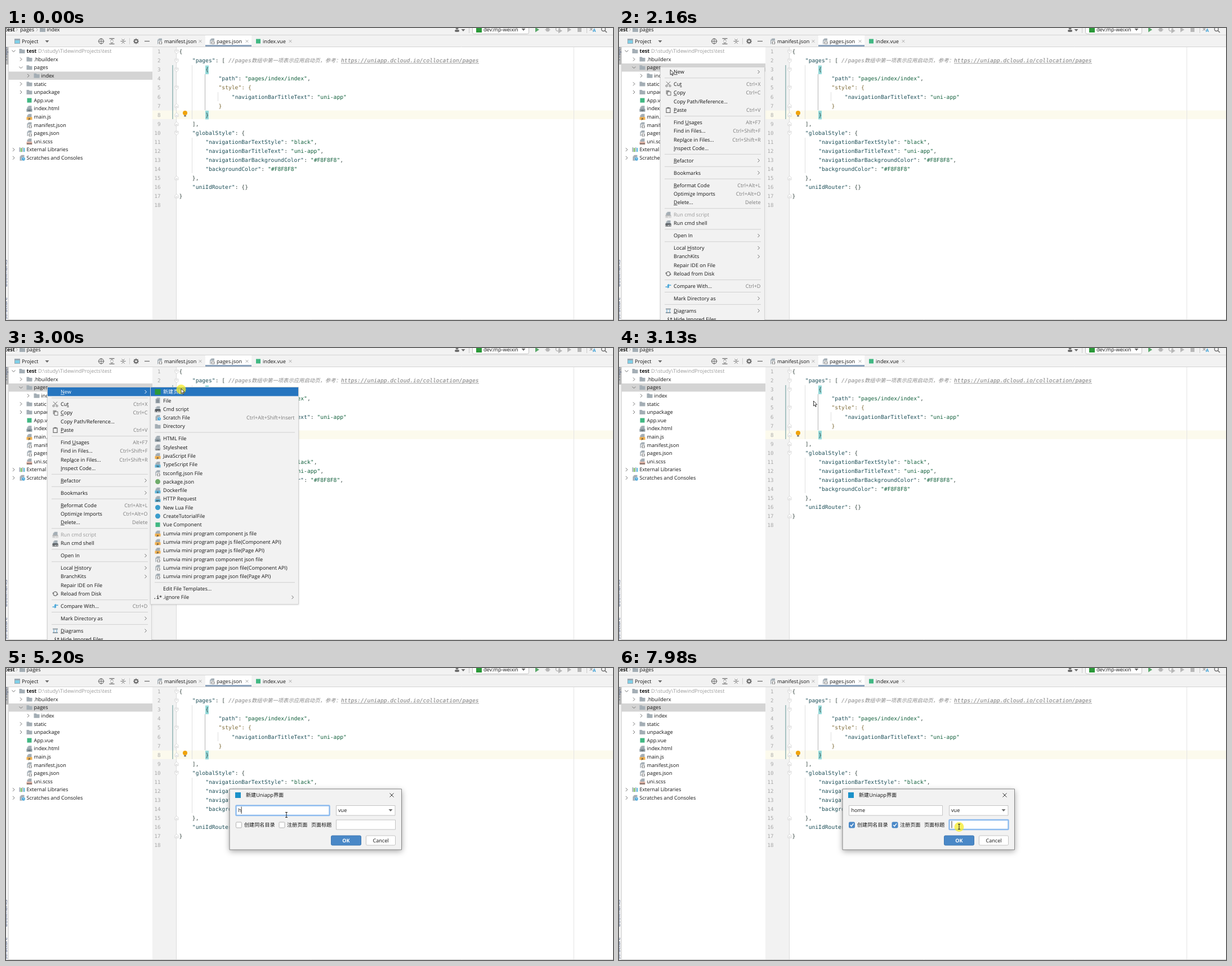
These frames come from a looping animation (1078 by 519 pixels, 8000 ms). An HTML page with a canvas:

```html
<!DOCTYPE html>
<html lang="zh">
<head>
<meta charset="utf-8">
<style>
html, body { margin: 0; width: 100%; height: 100%; overflow: hidden; background: #fff; }
canvas { display: block; }
</style>
</head>
<body>
<canvas id="stage" width="1078" height="519"></canvas>
<script>
const g = document.getElementById('stage').getContext('2d');
g.textRendering = 'geometricPrecision';
const UI = '"Open Sans", "Noto Sans CJK SC", "Noto Sans CJK", sans-serif';
const MONO = '"DejaVu Sans Mono", "Noto Sans CJK SC", monospace';
const INK = '#141414', GRAY = '#7c7c7c', PANEL = '#f2f2f2', BLUE = '#2675bf', GREEN = '#41b883', STEEL = '#6e6e6e';
const COL = 5.833, LINE = 16.06;

// y is the optical centre of the line
function text(s, x, y, color = INK, font = '9.1px ' + UI, align = 'left') {
  g.font = font;
  g.fillStyle = color;
  g.textAlign = align;
  g.fillText(s, x, y + 3.2);
}
function box(x, y, w, h, fill, stroke, r = 0, lw = 1) {
  g.beginPath();
  g.roundRect(x, y, w, h, r);
  if (fill) { g.fillStyle = fill; g.fill(); }
  if (stroke) { g.strokeStyle = stroke; g.lineWidth = lw; g.stroke(); }
}
function path(points, stroke, lw = 1, fill) {
  g.beginPath();
  for (let i = 0; i < points.length; i += 2) g.lineTo(points[i], points[i + 1]);
  if (fill) { g.closePath(); g.fillStyle = fill; g.fill(); }
  if (stroke) { g.strokeStyle = stroke; g.lineWidth = lw; g.stroke(); }
}
function disc(x, y, r, fill, stroke, lw = 1) {
  g.beginPath();
  g.arc(x, y, r, 0, 7);
  if (fill) { g.fillStyle = fill; g.fill(); }
  if (stroke) { g.strokeStyle = stroke; g.lineWidth = lw; g.stroke(); }
}
function at(x, y, draw) {
  g.save();
  g.translate(x, y);
  draw();
  g.restore();
}
function shadow(blur, alpha, draw) {
  g.save();
  g.shadowColor = `rgba(0,0,0,${alpha})`;
  g.shadowBlur = blur;
  g.shadowOffsetY = blur / 4;
  draw();
  g.restore();
}
const right = (x, y, c = STEEL) => path([x - 1.5, y - 3, x + 1.5, y, x - 1.5, y + 3], c);
const down = (x, y, c = STEEL) => path([x - 3, y - 1.5, x, y + 1.5, x + 3, y - 1.5], c);
const caretDown = (x, y) => path([x - 3.5, y - 2, x + 3.5, y - 2, x, y + 2], null, 0, '#6a6a6a');
const play = (x, y, c) => path([x - 3, y - 4.5, x + 4, y, x - 3, y + 4.5], null, 0, c);
const cross = (x, y, r, c) => { path([x - r, y - r, x + r, y + r], c); path([x - r, y + r, x + r, y - r], c); };

const TAGS = { html: ['#8b9aa3', '<>'], js: ['#f0b04f', 'JS'], css: ['#b9c0c5', 'CSS'], ts: ['#5fb4d8', 'TS'],
  api: ['#5fb4d8', 'API'], docker: ['#5fb4d8', 'D'], sass: ['#eebfb0', 'SASS'], cmd: ['#33383d', 'CMD'], cmdOff: ['#b5b5b5', 'CMD'] };
function icon(kind, x, y) {
  if (!kind) return;
  at(x, y, () => {
    if (kind === 'dir') return path([-5, -4, -1, -4, 0.5, -2.5, 5, -2.5, 5, 4, -5, 4], null, 0, '#a4aeb5');
    if (kind === 'vue') return box(-4, -4, 8, 8, GREEN);
    if (kind === 'uni') return box(-5, -5, 10, 10, '#2b9939');
    if (kind === 'node') return disc(0, 0, 4.5, '#6fab6a');
    if (kind === 'lua') return disc(0, 0, 4.5, '#3b9dcc');
    if (kind === 'cut') {
      path([-3.5, -4.5, 2.5, 2], STEEL); path([3.5, -4.5, -2.5, 2], STEEL);
      disc(-3, 3, 1.6, null, STEEL); disc(3, 3, 1.6, null, STEEL);
      return;
    }
    if (kind === 'copy') { box(-4, -4.5, 6, 7, '#9a9a9a'); return box(-1.5, -2, 6, 6.5, PANEL, STEEL); }
    if (kind === 'paste') { box(-3.5, -3.5, 7, 8, null, STEEL, 0, 1.2); return box(-2, -5, 4, 2.5, STEEL); }
    if (kind === 'reload') {
      g.beginPath(); g.arc(0, 0, 3.6, 3.4, 6); g.moveTo(3.5, 1); g.arc(0, 0, 3.6, 0.3, 2.9);
      g.strokeStyle = STEEL; g.lineWidth = 1.3; g.stroke();
      path([-5, -2.5, -1.5, -0.5, -4.5, 1], null, 0, STEEL);
      return path([5, 2.5, 1.5, 0.5, 4.5, -1], null, 0, STEEL);
    }
    if (kind === 'diff') {
      path([-5, 1.5, 0, 1.5], '#389fd6', 1.4); path([0, -1.5, 5, -1.5], '#389fd6', 1.4);
      path([-1, -1.2, 2, 1.5, -1, 4.2], null, 0, '#389fd6');
      return path([1, -4.2, -2, -1.5, 1, 1.2], null, 0, '#389fd6');
    }
    if (kind === 'diagram') {
      box(-4.5, -4, 9, 2, '#8f9ba3'); box(-4.5, 2.5, 9, 2, '#8f9ba3');
      path([-2.5, -2, -2.5, 3], '#5fa9d4');
      return path([2.5, -2, 2.5, 3], '#5fa9d4');
    }
    if (kind === 'ignore') return text('.i*', 0, 0, '#333', 'bold 8.5px ' + MONO, 'center');
    if (kind === 'libs') {
      ['#9aa7b0', '#62b543', '#9aa7b0', '#40b6e0'].forEach((c, i) => box(-5 + i * 2.7, -4 + i % 2, 1.8, 8 - i % 2, c));
      return;
    }
    path([-1, -5, 4, -5, 4, 5, -4, 5, -4, -2], null, 0, '#a4aeb5');
    path([-4, -2.6, -1.6, -5, -1.6, -2.6], null, 0, '#c3cacf');
    if (kind === 'scratch') { disc(2.5, 2, 3.2, '#389fd6', '#fff', .6); path([2.5, 0, 2.5, 2.3, 4, 2.3], '#fff', .8); }
    else if (kind === 'json') { box(-2.5, -1, 8, 6.5, '#f4f4f4'); text('{}', 1.5, 1.3, '#555', 'bold 6px ' + MONO, 'center'); }
    else if (kind === 'file') { for (const d of [-1, 1, 3]) path([-2.5, d, 2.5, d], '#5e6a72', .8); }
    else { const [c, label] = TAGS[kind]; box(-5, 0.5, 10, 5, c); text(label, 0, 2, kind.startsWith('cmd') ? '#fff' : '#333', 'bold 4px ' + UI, 'center'); }
  });
}

const CODE = `{
    "pages": [
        {
            "path": "pages/index/index",
            "style": {
                "navigationBarTitleText": "uni-app"
            }
        }
    ],
    "globalStyle": {
        "navigationBarTextStyle": "black",
        "navigationBarTitleText": "uni-app",
        "navigationBarBackgroundColor": "#F8F8F8",
        "backgroundColor": "#F8F8F8"
    },
    "uniIdRouter": {}
}
`.split('\n');
const TREE = [
  ['dir', 'test', 0, 'v'], ['dir', '.hbuilderx', 1, '>'], ['dir', 'pages', 1, 'v'], ['dir', 'index', 2, '>'],
  ['dir', 'static', 1, '>'], ['dir', 'unpackage', 1, '>'], ['vue', 'App.vue', 1], ['html', 'index.html', 1],
  ['js', 'main.js', 1], ['json', 'manifest.json', 1], ['json', 'pages.json', 1], ['sass', 'uni.scss', 1],
  ['libs', 'External Libraries', 0, '>'], ['scratch', 'Scratches and Consoles', 0, '>']];
// icon | label with _ before the mnemonic | shortcut or > for a submenu
const parse = s => s.trim().split('\n').map(l => l.split('|'));
const MENU = parse(`
|_New|>
-
cut|Cu_t|Ctrl+X
copy|_Copy|Ctrl+C
|Copy Path/Reference...
paste|_Paste|Ctrl+V
-
|Find _Usages|Alt+F7
|Find in Files...|Ctrl+Shift+F
|Repl_ace in Files...|Ctrl+Shift+R
|_Inspect Code...
-
|_Refactor|>
-
|Bookmarks|>
-
|_Reformat Code|Ctrl+Alt+L
|Optimi_ze Imports|Ctrl+Alt+O
|_Delete...|Delete
-
cmdOff|Run cmd script
cmd|Run cmd shell
-
|Open In|>
-
|Local _History|>
|BranchKits|>
|Repair IDE on File
reload|Reload from Disk
-
diff|Compare With...|Ctrl+D
-
|Mark Directory as|>
-
diagram|_Diagrams|>
ignore|Hide Ignored Files`);
const SUBMENU = parse(`
uni|新建页面
file|File
cmd|Cmd script
scratch|Scratch File|Ctrl+Alt+Shift+Insert
dir|Directory
-
html|HTML File
css|Stylesheet
js|JavaScript File
ts|TypeScript File
json|tsconfig.json File
node|package.json
docker|Dockerfile
api|HTTP Request
lua|New Lua File
lua|CreateTutorialFile
vue|Vue Component
js|Lumvia mini program component js file
js|Lumvia mini program page js file(Component API)
js|Lumvia mini program page js file(Page API)
json|Lumvia mini program component json file
json|Lumvia mini program page json file(Component API)
json|Lumvia mini program page json file(Page API)
-
|Edit File Templates...
ignore|.ignore File|>`);

function toolbar(selected) {
  box(0, 0, 1078, 33, PANEL);
  path([0, 12.5, 1078, 12.5], '#d4d4d4');
  path([0, 33.5, 1078, 33.5], '#d4d4d4');
  text('test', -2, 3, INK, 'bold 9.1px ' + UI);
  right(19, 3, '#aaa');
  if (!selected) { text('pages', 25, 3); right(55, 3, '#aaa'); }
  const x = selected ? 29 : 65;
  icon('dir', x, 3);
  text(selected ? 'pages' : 'index', x + 7.5, 3);

  disc(801, 0, 2.5, STEEL); box(797, 3, 8, 4, STEEL, null, 2); caretDown(812, 4);
  path([822.5, 0, 822.5, 9], '#ccc');
  box(828.5, -6, 100, 16.5, '#fff', '#c0c0c0', 3);
  icon('uni', 840, 3);
  text('dev:mp-weixin', 848, 3);
  caretDown(919, 3);
  play(943, 3, '#59a869');
  disc(962, 3, 3.5, '#b8b8b8'); path([957, 3, 967, 3], '#b8b8b8');
  disc(980, 2, 3.5, null, '#b8b8b8', 1.5); play(984, 5, '#b8b8b8');
  play(1000, 3, '#b8b8b8');
  box(1015, 0, 7, 7, '#b8b8b8');
  path([1031.5, 0, 1031.5, 9], '#ccc');
  text('文', 1036, 1, '#555', '6.5px ' + UI); text('A', 1042, 4, '#389fd6', 'bold 8px ' + UI);
  disc(1061, 2, 3.5, null, STEEL, 1.4); path([1063.5, 4.5, 1067, 8], STEEL, 1.6);

  box(15, 19, 10, 9, '#9aa7b0'); box(16, 22, 8, 5, '#7fd0e8');
  text('Project', 28, 23.5);
  caretDown(73, 24);
  disc(169, 23.5, 4.3, null, STEEL, 1.2);
  path([169, 18, 169, 29], STEEL); path([163.5, 23.5, 174.5, 23.5], STEEL);
  for (const [x, dir] of [[188, 1], [208, -1]]) {
    for (const s of [-1, 1]) {
      if (dir > 0) path([x - 4.5, 23.5 + s * 4.8, x + 4.5, 23.5 + s * 4.8], STEEL, 1.3);
      path([x - 2.5, 23.5 + s * (dir > 0 ? 1 : 4), x, 23.5 + s * (dir > 0 ? 3.5 : 1.5), x + 2.5, 23.5 + s * (dir > 0 ? 1 : 4)], STEEL);
    }
    if (dir < 0) path([x - 4.5, 23.5, x + 4.5, 23.5], STEEL);
  }
  path([219.5, 18, 219.5, 29], '#d0d0d0');
  disc(231, 23.5, 2.8, null, STEEL, 2);
  for (let a = 0; a < 8; a++) {
    const c = Math.cos(a * Math.PI / 4), s = Math.sin(a * Math.PI / 4);
    path([231 + c * 3, 23.5 + s * 3, 231 + c * 5, 23.5 + s * 5], STEEL, 1.5);
  }
  path([246, 23.5, 255, 23.5], STEEL, 1.3);

  box(354, 13, 82, 20, '#fff');
  box(354, 30, 82, 3, '#8ca3bd');
  for (const [kind, label, x, close] of [['json', 'manifest.json', 273, 345], ['json', 'pages.json', 366, 428], ['vue', 'index.vue', 448, 505]]) {
    icon(kind, x, 23.5);
    text(label, x + 8, 23.5);
    cross(close, 23.5, 2.3, '#a8a8a8');
  }
}
function tree(selected) {
  box(5, 34, 255, 485, '#fff');
  box(5, selected ? 63 : 77.5, 255, 14.5, '#d4d4d4');
  TREE.forEach(([kind, label, depth, arrow], i) => {
    const y = 41 + i * 14.6, x = 29 + depth * 13;
    if (arrow) (arrow === 'v' ? down : right)(x - 15.5, y);
    icon(kind, x - 0.5, y);
    text(label, x + 7.5, y, INK, (i ? '' : 'bold ') + '9.1px ' + UI);
  });
  text('D:\\study\\TidewindProjects\\test', 57, 41, '#999');
  g.save();
  g.beginPath(); g.rect(0, 13, 4.5, 506); g.clip();
  box(0, 13, 5, 506, PANEL);
  box(0, 13, 5, 52, '#b9b9b9');
  for (const [label, y] of [['Project', 58], ['Bookmarks', 460], ['Structure', 518]])
    at(0, y, () => { g.rotate(-Math.PI / 2); text(label, 0, -1.5, '#3d4f78'); });
  g.restore();
  path([4.5, 13, 4.5, 519], '#d0d0d0');
}
function editor() {
  box(260, 34, 818, 485, '#fff');
  box(260, 34, 42.5, 485, PANEL);
  box(260, 146.5, 818, 15.5, '#fcfaed');
  path([302.5, 34, 302.5, 519], '#dcdcdc');
  path([1008.5, 34, 1008.5, 519], '#e4e4e4');
  path([296, 66, 296, 162], '#8fb3b3', 1.5);
  for (const [x, a, b] of [[330.5, 66, 162], [330.5, 195, 258], [376.5, 114, 130]]) path([x, a, x, b], '#e0e0e0');
  path([353.5, 82, 353.5, 146], '#b5b5b5');
  for (const n of [3, 8]) box(354, 34.5 + (n - 1) * LINE, 6, 15.5, '#93d9d9');
  CODE.forEach((line, i) => {
    const y = 42 + i * LINE;
    text(i + 1, 274.5, y, '#a8a8a8', '9.2px ' + MONO, 'right');
    for (const m of line.trimEnd().matchAll(/"[^"]*"(?=:)|"[^"]*"|[^"\s][^"]*/g)) {
      const quoted = m[0][0] === '"', key = quoted && line[m.index + m[0].length] === ':';
      const color = i === 4 || i === 6 ? '#7d6a35' : key ? '#1d4f58' : quoted ? '#12603c' : '#3b4a45';
      text(m[0], 307.5 + m.index * COL, y, color, '9.69px ' + MONO);
    }
  });
  for (const n of [1, 2, 3, 5, 7, 8, 9, 10, 15, 17]) {
    const y = 42 + (n - 1) * LINE, s = [7, 8, 9, 15, 17].includes(n) ? -1 : 1;
    path([300, y - 3 * s, 306, y - 3 * s, 306, y + s, 303, y + 4 * s, 300, y + s, 300, y - 3 * s], '#cfcfcf', .8, '#fff');
    path([301.5, y - s, 304.5, y - s], '#bbb', .8);
  }
  const italic = 'italic 9.69px ' + MONO;
  text('//pages', 395, 58, '#8a8a8a', italic);
  text('数组中第一项表示应用启动页，参考：', 436, 58, '#8a8a8a', 'italic 300 9.35px "Noto Sans CJK SC", "Noto Sans CJK", sans-serif');
  text('https://uniapp.dcloud.io/collocation/pages', 595, 58, '#777', italic);
  path([595, 62.9, 840, 62.9], '#888', .8);
  disc(318, 151, 4, '#f0a30a'); box(316.3, 155, 3.4, 2.5, '#777');
}
function popup(items, x, w, h, pad, selected) {
  shadow(3, .15, () => box(x, 69, w, h, PANEL));
  box(x + .5, 69.5, w - 1, h - 1, PANEL, '#d2d2d2');
  if (selected) box(x + 1, 70, w - 2, 15.5, BLUE);
  let y = 78;
  items.forEach(([kind, label, extra], i) => {
    if (kind === '-') { path([x + 8, y - 4.5, x + w - 7, y - 4.5], '#d0d0d0'); y += 6.6; return; }
    const color = selected && !i ? '#fff' : kind === 'cmdOff' ? '#999' : INK;
    icon(kind, x + pad - 9.5, y);
    const mark = label.indexOf('_'), plain = label.replace('_', '');
    text(plain, x + pad, y, color);
    if (mark >= 0) {
      const a = x + pad + g.measureText(plain.slice(0, mark)).width;
      path([a, y + 4.7, a + g.measureText(plain[mark]).width, y + 4.7], color, .8);
    }
    if (extra === '>') right(x + w - 11, y, selected && !i ? '#fff' : STEEL);
    else if (extra) text(extra, x + w - 7.5, y, GRAY, undefined, 'right');
    y += 15.3;
  });
}
function field(x, y, w, h, focused) {
  box(x, y, w, h, '#fff', focused ? '#8dbbee' : '#c4c4c4', focused ? 1 : 0, focused ? 2.4 : 1);
}
function checkbox(x, on, focused) {
  if (focused) box(x - 6.5, 272.5, 13, 13, '#a8cdf3', null, 3);
  box(x - 5, 274, 10, 10, on ? '#4a88c7' : '#fff', on ? '#4a88c7' : '#b0b0b0', 1.5);
  if (on) path([x - 2.8, 279, x - .7, 281.3, x + 3, 276.4], '#fff', 1.5);
}
function dialog(t) {
  const focus = t < 3680 ? 'ok' : t < 7020 ? 'name' : t < 7560 ? 'dir' : t < 7950 ? 'reg' : 'title';
  shadow(10, .35, () => box(397, 215, 306, 108, PANEL));
  box(397, 215, 305.5, 108, PANEL, '#858585');
  box(407, 221, 10, 10, '#1b91c9');
  text('新建Uniapp界面', 426, 226);
  cross(685, 226, 3.5, '#333');
  field(408.5, 244.5, 166, 17.5, focus === 'name');
  const name = 'home'.slice(0, [5200, 5530, 5670, 5870].filter(k => t >= k).length);
  text(name, 412.5, 253);
  const caret = t < 4210 || t >= 4670 && t < 6270 || t >= 6740;
  if (focus === 'name' && caret) {
    const x = 412.5 + g.measureText(name).width;
    path([x, 246.5, x, 259], '#222', .9);
  }
  field(586.5, 244.5, 104.5, 17.5);
  text('vue', 590, 253);
  caretDown(683, 253);
  checkbox(413.5, t >= 7020, focus === 'dir');
  text('创建同名目录', 423, 279);
  checkbox(490, t >= 7560, focus === 'reg');
  text('注册页面', 499, 279);
  text('页面标题', 542, 278.5);
  field(586.5, 270, 105, 17, focus === 'title');
  if (focus === 'title') path([591, 272, 591, 284.5], '#222', .9);
  if (focus === 'ok') box(576, 296.5, 56, 20, '#a0c8f4', null, 4);
  box(577.5, 298, 53, 17, '#4a88c7', '#3f79b3', 2);
  text('OK', 604, 306.5, '#fff', 'bold 9.1px ' + UI, 'center');
  box(639.5, 298, 52, 17, '#fff', '#c4c4c4', 2);
  text('Cancel', 665.5, 306.5, INK, undefined, 'center');
}

// pointer keys: time, x, y
const MOVES = [[70, 973, 500], [200, 800, 400], [450, 300, 170], [600, 110, 95], [740, 51, 74], [810, 63, 72],
  [890, 63, 72], [1030, 69, 64], [1230, 69, 64], [1360, 72, 65], [1689, 72, 65], [1690, 73, 72], [2030, 73, 72],
  [2440, 130, 79], [2650, 235, 79], [2860, 311, 72], [3070, 311, 72], [3300, 441, 155], [3540, 498, 261],
  [6200, 498, 261], [6340, 490, 266], [6540, 482, 279], [6900, 413, 281], [7290, 413, 281], [7500, 490, 281],
  [7600, 490, 281], [7910, 604, 282], [8000, 604, 282]];
const CLICKS = [1890, 2970, 3680, 7020, 7560, 7950];
function pointer(t) {
  if (t < MOVES[0][0]) return;
  const i = MOVES.findIndex(m => m[0] > t), [t0, x0, y0] = MOVES[i - 1], [t1, x1, y1] = MOVES[i];
  const k = (t - t0) / (t1 - t0), x = x0 + (x1 - x0) * k, y = y0 + (y1 - y0) * k;
  const beam = t > 3270 && (x > 408 && x < 575 && y > 244 && y < 263 || x > 586 && x < 691 && y > 270 && y < 288);
  if (CLICKS.some(c => t >= c && t < c + 100)) disc(x, y + (beam ? 0.5 : 1.5), 8.5, 'rgba(245,235,40,.75)');
  at(x, y, () => {
    if (beam) {
      path([0, -4.5, 0, 4.5], '#222');
      for (const s of [-4.5, 4.5]) path([-2, s, 2, s], '#222');
    } else path([0, 0, 0, 9, 2, 7.2, 3.4, 10.4, 4.8, 9.8, 3.4, 6.7, 6.2, 6.5, 0, 0], '#222', .9, '#fff');
  });
}

function frame(now) {
  const t = now % 8000, selected = t >= 1890;
  tree(selected);
  editor();
  toolbar(selected);
  path([5, 518.5, 1078, 518.5], '#c9c9c9');
  if (t >= 2030 && t < 3070) popup(MENU, 73, 186, 460, 24, t >= 2230);
  if (t >= 2580 && t < 3070) popup(SUBMENU, 256, 264, 387, 23, t >= 2720);
  if (t >= 3270) dialog(t);
  pointer(t);
  requestAnimationFrame(frame);
}
requestAnimationFrame(frame);
</script>
</body>
</html>
```
